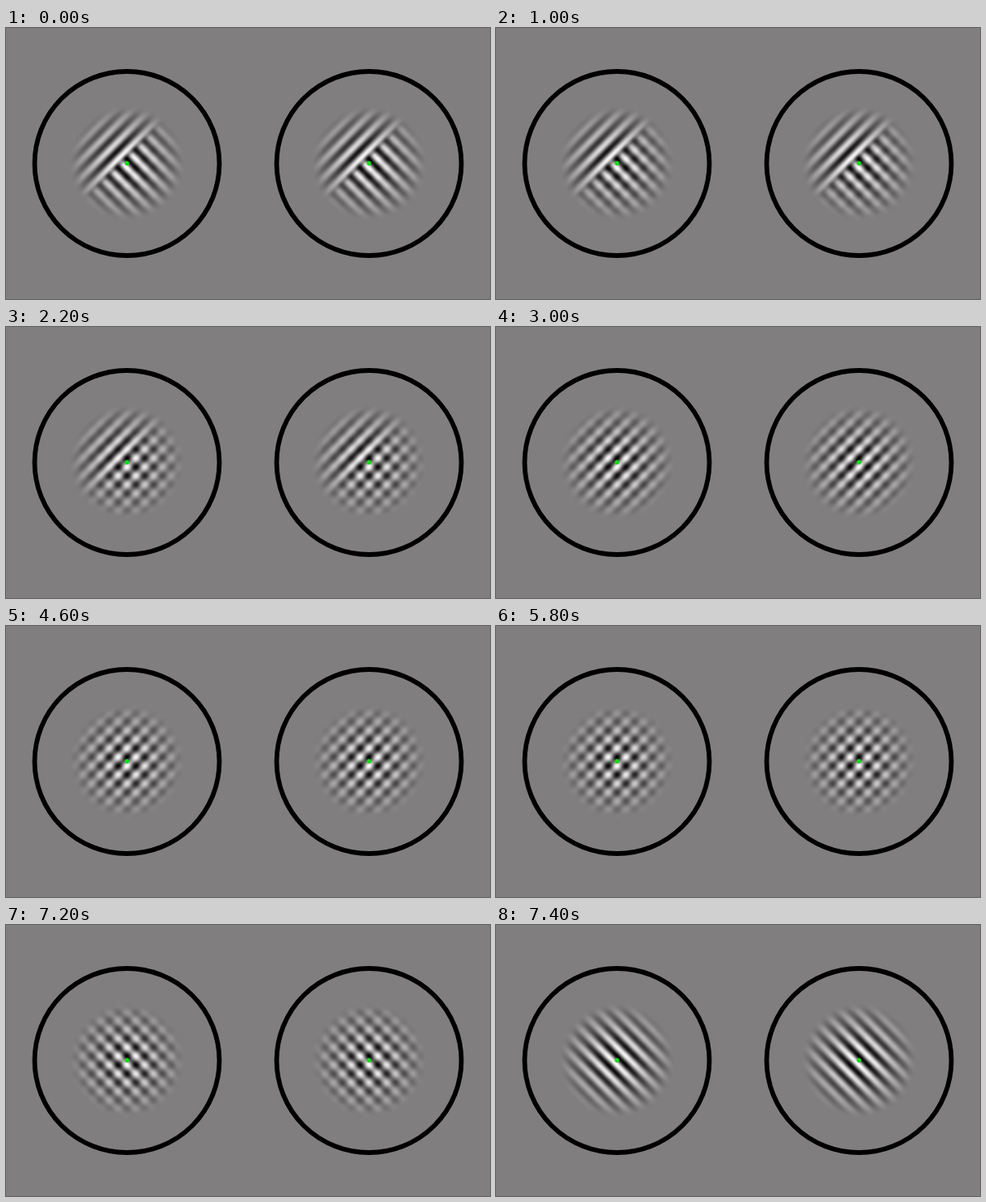
Animation of 600 by 337 pixels, one loop 8 s. Source, as an HTML page with a canvas:

```html
<!DOCTYPE html>
<html lang="en">
<head>
<meta charset="utf-8">
<title>Binocular rivalry</title>
<style>
  html, body { margin: 0; width: 100%; height: 100%; overflow: hidden; background: #807e7f; }
  canvas { display: block; }
</style>
</head>
<body>
<canvas id="stage" width="600" height="337"></canvas>
<script>
const ctx = document.getElementById('stage').getContext('2d');
const LOOP = 8000, STEP = 200;
const HALF = 76, SIZE = HALF * 2;
const BASE = [128, 126, 127];
const WAVE = 2 * Math.PI / 22.2;

const clamp = x => Math.min(1, Math.max(0, x));
const smooth = x => (x = clamp(x), x * x * (3 - 2 * x));

// Share of the falling "\" grating: it recovers slowly, then takes over quickly.
function upperShare(t) {
  const recovery = 1 - Math.exp(-Math.max(0, t - 1700) / 2400);
  const takeover = clamp((t - 6400) / 1000) ** 4;
  return .02 + .48 * recovery + .51 * takeover;
}

// Below the diagonal the falling grating starts dominant and fades out first.
const lowerShare = t => Math.max(upperShare(t), .92 - .42 * (t / 2000) ** 2);

// Both gratings under a soft round window, and the side of the diagonal.
const rising = new Float32Array(SIZE * SIZE);
const falling = new Float32Array(SIZE * SIZE);
const side = new Float32Array(SIZE * SIZE);
for (let i = 0; i < SIZE * SIZE; i++) {
  const x = i % SIZE - HALF + .5, y = Math.floor(i / SIZE) - HALF;
  const r = Math.hypot(x, y);
  const gain = 127 * Math.exp(-r * r / (2 * 34 * 34)) * smooth((74 - r) / 18);
  rising[i] = gain * Math.sin(WAVE * (x + y));
  falling[i] = gain * Math.sin(WAVE * (y - x));
  side[i] = smooth((x + y + 9) / 14 + .5);
}

const patch = ctx.createImageData(SIZE, SIZE);

function paintPatch(t) {
  const upper = upperShare(t), lower = lowerShare(t);
  for (let i = 0; i < SIZE * SIZE; i++) {
    const share = upper + (lower - upper) * side[i];
    const light = rising[i] + (falling[i] - rising[i]) * share;
    for (let c = 0; c < 3; c++) patch.data[i * 4 + c] = BASE[c] + light;
    patch.data[i * 4 + 3] = 255;
  }
}

function circlePath(x, y, r) {
  ctx.beginPath();
  ctx.arc(x, y, r, 0, 2 * Math.PI);
}

function drawEye(x) {
  ctx.putImageData(patch, x - HALF, 168 - HALF);
  circlePath(x, 168.5, 114.5);
  ctx.lineWidth = 5.8;
  ctx.strokeStyle = '#000';
  ctx.stroke();
  circlePath(x, 168.3, 2.7);
  ctx.fillStyle = '#12dc18';
  ctx.fill();
}

function draw(t) {
  paintPatch(t);
  ctx.fillStyle = `rgb(${BASE})`;
  ctx.fillRect(0, 0, 600, 337);
  drawEye(150);
  drawEye(450);
}

let shown = -1;
function tick() {
  const t = Math.floor(performance.now() % LOOP / STEP) * STEP;
  if (t !== shown) draw(shown = t);
  requestAnimationFrame(tick);
}
tick();
</script>
</body>
</html>
```
